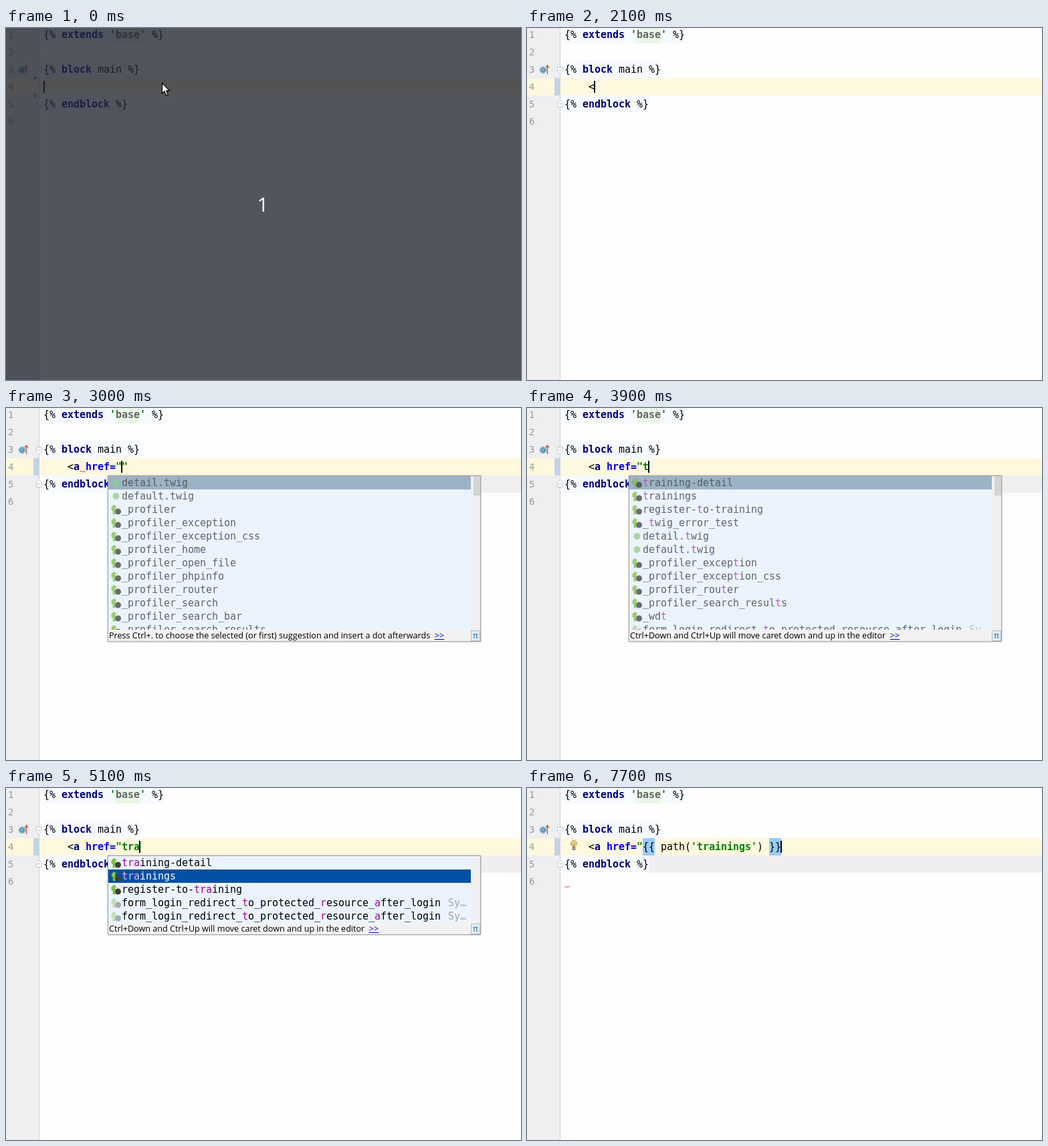
Write an HTML page that moves like this. It is 770 px wide and 527 px high and loops after 8 s.

```html
<!DOCTYPE html>
<html lang="en">
<head>
<meta charset="utf-8">
<title>Template completion</title>
<style>
html, body { margin: 0; width: 100%; height: 100%; overflow: hidden; background: #fefefe; }
#stage { position: relative; width: 770px; height: 527px; overflow: hidden; background: #fefefe; }
#stage div, #stage svg { position: absolute; }
.line, .row { font: 15px "DejaVu Sans Mono", monospace; letter-spacing: -.03px; white-space: pre; color: #000; }
.line { left: 56px; height: 26px; line-height: 26px; }
.tint { background: #f6faff; }
.num { left: 3px; font: 14px/26px "DejaVu Sans Mono", monospace; color: #999; }
.key { font-weight: bold; color: #000080; }
.str { font-weight: bold; color: #008000; }
.attr { font-weight: bold; color: #0000e6; }
.ref { font-weight: bold; color: #666; background: #e9f7e6; display: inline-block; height: 26px; }
.popup { box-sizing: border-box; border: 1px solid #a3a3a3; background: #ebf4fe; box-shadow: 0 0 2px #0005; overflow: hidden; }
.row { left: 0; height: 20px; line-height: 20px; color: #000; }
.row div { top: 0; }
.row b { font-weight: normal; color: #a000a8; }
.row .tail { left: 508px; color: #a2a5a9; }
.row.sel { background: #0450a4; color: #fff; }
.row.sel b { color: #ebb8ee; }
.soft .row { color: #5f646a; }
.soft .row b { color: #c255cf; }
.soft .row.sel { background: #9cb3c5; color: #555b62; }
.soft .row.sel b { color: #bd50cc; }
.soft .row .tail { color: #b9bec4; }
.soft .row svg { opacity: .75; }
.row svg.dim { opacity: .4; }
.bar { background: #f2f2f2; }
.hint { font: 12.6px/17px "Open Sans", "Noto Sans", sans-serif; color: #000; white-space: pre; }
.hint u { color: #0000e0; }
.count { left: 0; width: 768px; top: 243px; text-align: center; font: 30px/41px "Open Sans", "Noto Sans", sans-serif; color: #fff; }
</style>
</head>
<body>
<div id="stage"></div>
<script>
const LOOP = 8000;
const stage = document.getElementById('stage');

const box = (x, y, w, h, color, extra = '') =>
  `<div style="left:${x}px;top:${y}px;width:${w}px;height:${h}px;background:${color};${extra}"></div>`;
const svg = (x, y, w, h, body, cls = '') =>
  `<svg class="${cls}" style="left:${x}px;top:${y}px" width="${w}" height="${h}">${body}</svg>`;
const shape = (d, fill, stroke = 'none', width = 1) =>
  `<path d="${d}" fill="${fill}" stroke="${stroke}" stroke-width="${width}"/>`;
const span = (cls, text) => `<span class="${cls}">${text}</span>`;
const key = text => span('key', text);
const str = text => span('str', text);
const rowTop = n => n * 26 - 29;
const line = (n, html, cls = '') => `<div class="line ${cls}" style="top:${rowTop(n)}px">${html}</div>`;

// Gutter pieces
const deletion = y => svg(41, y - 4, 8, 8, shape('M0 0 8 4 0 8Z', '#a0a0a0'));
const fold = (y, flip) => svg(44, y, 11, 12,
  `<g ${flip ? 'transform="matrix(1 0 0 -1 0 12)"' : ''}>` +
  shape('M1.5 .5H9.5V7L5.5 11.2 1.5 7Z', '#fff', '#c6c6c6') + shape('M3.5 5.5H7.5', 'none', '#b8b8b8') + '</g>');
const blockIcon = svg(18, 54, 18, 17,
  '<circle cx="6" cy="9" r="4.6" fill="#8fc4de" stroke="#4f93b5"/>' +
  '<circle cx="6" cy="9" r="2" fill="#d4ecf5" stroke="#33596e" stroke-width="1.2"/>' +
  shape('M12.5 15V3M10 5.2 12.5 2 15 5.2', 'none', '#c4614c', 1.5));
const squiggle = (x, y, w) => svg(x, y, w, 4,
  shape('M0 3l2-2 2 2 2-2 2 2 2-2', 'none', '#e04848'));
const bulb = svg(64, 78, 12, 16,
  '<circle cx="6" cy="5" r="4.4" fill="#ecd27a" stroke="#ae9548"/>' +
  shape('M4 5l2 2 2-2M6 7v3', 'none', '#ae9548') +
  shape('M3.5 10h5v4l-1 1h-3l-1-1Z', '#807d76') + shape('M4 12.2h4', 'none', '#c8c8c8'));

// Mouse pointers
const arrow = svg(232, 81, 15, 22,
  shape('M1.5 1.5V17L5 13.8 7.6 20 10.2 18.9 7.6 12.8H12.4Z', '#fff', '#000', 1.2));
const beamPath = 'M2 1.5H4.2Q5 1.5 5 2.5Q5 1.5 5.8 1.5H8M5 2V14M2 14.5H4.2Q5 14.5 5 13.5Q5 14.5 5.8 14.5H8';
const beam = svg(231, 76, 10, 17,
  shape(beamPath, 'none', '#fff', 4) + shape(beamPath, 'none', '#000', 1.7));

// Completion popup
const routeIcon = shape('M1 4.5 4.5 1 8 4.5H6.2V15H3V9H1Z', '#82c43c', '#6aa52e', .6) +
  '<circle cx="10.5" cy="11" r="4.5" fill="#3b3f42"/>';
const leafIcon = '<circle cx="7.5" cy="8" r="5" fill="#8fd18a"/>';
const icons = { route: [routeIcon], far: [routeIcon, 'dim'], leaf: [leafIcon] };

function item([icon, text], i, p) {
  const mark = icon ? svg(4, 2, 16, 16, ...icons[icon]) : '';
  const tail = icon === 'far' ? '<div class="tail">Sy…</div>' : '';
  const label = text.replace(/\[(.*?)\]/g, '<b>$1</b>');
  return `<div class="row ${i === p.sel ? 'sel' : ''}" style="top:${i * 20}px;width:${p.w - 16}px">` +
    `${mark}<div style="left:${icon ? 20 : 11}px">${label}</div>${tail}</div>`;
}

function popup(p) {
  const foot = p.h - 19, side = p.w - 16;
  return `<div class="popup ${p.soft ? 'soft' : ''}" style="left:${p.x}px;top:101px;width:${p.w}px;height:${p.h}px">` +
    p.items.map((it, i) => item(it, i, p)).join('') +
    box(side, 0, 16, foot, '#f0f0f1') +
    (p.thumb ? box(side + 4, 0, 10, 29, '#d4d4d4') : '') +
    `<div class="bar hint" style="left:0;top:${foot}px;width:${p.w}px;height:18px"><div style="left:1px">${p.hint}  <u>&gt;&gt;</u></div></div>` +
    `<div style="box-sizing:border-box;left:${side}px;top:${foot + 1}px;width:14px;height:16px;border:1px solid #b5bdc4;background:#e4eef7;` +
    `font:13px/13px 'DejaVu Sans',sans-serif;color:#3978b0;text-align:center">π</div></div>`;
}

const routes = names => names.split(' ').map(n => ['route', n]);
const far = ['far', 'form_login_redirect_[t]o_protected_[r]esource_[a]fter_login'];
const dotHint = 'Press Ctrl+. to choose the selected (or first) suggestion and insert a dot afterwards';
const moveHint = 'Ctrl+Down and Ctrl+Up will move caret down and up in the editor';
const tall = { w: 558, h: 249, sel: 0, soft: true, thumb: true, hint: dotHint };

const attrList = { ...tall, x: 107, w: 524, items:
  '[h]ref [h]reflang [h]idden c[h]arset s[h]ape aria-[h]aspopup aria-[h]idden onc[h]ange onpage[h]ide onpages[h]ow ontouc[h]end on[h]ashchange'
    .split(' ').map(n => ['', n]) };
const allList = { ...tall, x: 152, items: [['leaf', 'detail.twig'], ['leaf', 'default.twig'],
  ...routes('_profiler _profiler_exception _profiler_exception_css _profiler_home _profiler_open_file ' +
    '_profiler_phpinfo _profiler_router _profiler_search _profiler_search_bar _profiler_search_results')] };
const tList = { ...tall, x: 152, hint: moveHint, items: [
  ...routes('[t]raining-detail [t]rainings register-[t]o-training _[t]wig_error_test'),
  ['leaf', 'detail.[t]wig'], ['leaf', 'default.[t]wig'],
  ...routes('_profiler_excep[t]ion _profiler_excep[t]ion_css _profiler_rou[t]er _profiler_search_resul[t]s _wd[t]'),
  ['far', 'form_login_redirect_[t]o_protected_resource_after_login']] };
const traList = { x: 152, w: 558, h: 119, sel: 0, soft: true, hint: moveHint, items: [
  ...routes('[tra]ining-detail [tra]inings register-to-[tra]ining'), far, far] };
const picked = { ...traList, sel: 1, soft: false };

// Typed text
const tagA = '    &lt;' + key('a');
const href = tagA + ' ' + span('attr', 'href=');
const call = href + str('"') + '{{ path(' + str("'trainings'") + ') }}';

// Each step changes part of the state from its time on.
const steps = [
  [0, { text: '', col: 0, caret: true, veil: true, cuts: [75, 101], marks: [] }],
  [300, { veil: false, caret: false, beam: true }],
  [600, { caret: true }],
  [1200, { beam: false, col: 1, cuts: [75], changed: true }],
  [1300, { col: 2 }],
  [1400, { caret: false }],
  [1500, { col: 3, caret: true }],
  [1800, { col: 4 }],
  [2100, { text: '    &lt;', col: 5, cuts: [] }],
  [2300, { text: tagA, col: 6 }],
  [2400, { band: true }],
  [2600, { text: tagA + ' ', col: 7 }],
  [2700, { text: tagA + ' ' + span('attr', 'h'), col: 8, wave: true }],
  [2800, { list: attrList }],
  [3000, { text: href + str('""'), col: 13, list: allList }],
  [3200, { list: null, marks: [12, 13], markLen: 1 }],
  [3600, { text: href + str('"t'), col: 14, marks: [] }],
  [3700, { wave: false }],
  [3900, { list: tList }],
  [4000, { text: href + str('"tr'), col: 15 }],
  [4100, { text: href + str('"tra'), col: 16, list: traList }],
  [4600, { caret: false }],
  [4900, { list: picked }],
  [5100, { caret: true }],
  [5600, { caret: false }],
  [6300, { caret: true }],
  [6700, { caret: false }],
  [6900, { text: call, col: 36, caret: true, list: null }],
  [7000, { marks: [13, 34], markLen: 2 }],
  [7500, { endWave: true }],
  [7700, { bulb: true }]
];

function draw(s) {
  let out = box(0, 0, 49, 527, '#eeeff1') + box(0, 75, 770, 26, '#fef8df') + box(49, 0, 1, 527, '#cfcfd1');
  for (let n = 1; n <= 6; n++) out += `<div class="num" style="top:${rowTop(n)}px">${n}</div>`;
  if (s.changed) out += box(41, 75, 8, 26, '#c3d3e8');
  out += s.cuts.map(deletion).join('') + blockIcon;
  if (s.band) out += box(182, 101, 588, 26, '#f0eef0');
  out += s.marks.map(c => box(56 + c * 9, 75, s.markLen * 9, 26, '#99ccff')).join('');
  out += line(1, `{% ${key('extends')} ${str("'")}${span('ref', 'base')}${str("'")} %}`, 'tint') +
    line(3, `{% ${key('block')} main %}`, 'tint') +
    line(4, s.text) +
    line(5, `{% ${key('endblock')} %}`, 'tint');
  out += fold(58) + fold(107, true);
  if (s.wave) out += squiggle(110, 93, 9);
  if (s.endWave) out += squiggle(56, 146, 8);
  if (s.bulb) out += bulb;
  if (s.caret) out += box(s.col ? 55 + s.col * 9 : 56, 79, 2, 18, '#000');
  if (s.list) out += popup(s.list);
  if (s.veil) out += box(0, 0, 770, 527, 'rgba(34,38,47,.78)') + '<div class="count">1</div>' + arrow;
  if (s.beam) out += beam;
  stage.innerHTML = out;
}

let shown = -1;
function tick() {
  const t = performance.now() % LOOP;
  const past = steps.filter(([at]) => at <= t);
  if (past.length !== shown) {
    shown = past.length;
    draw(Object.assign({}, ...past.map(([, change]) => change)));
  }
  requestAnimationFrame(tick);
}
tick();
</script>
</body>
</html>
```
